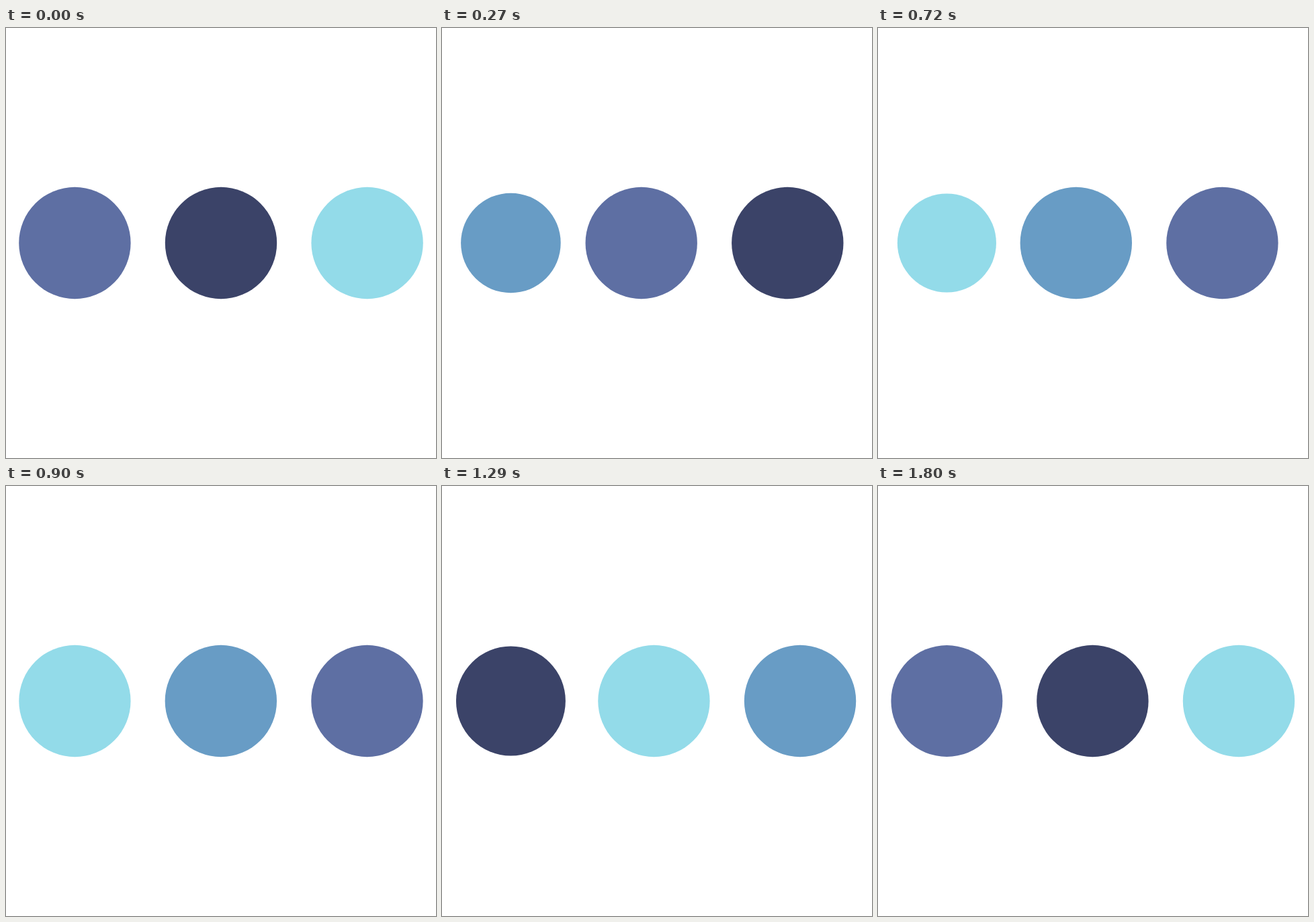
Animation, 640 px wide and 640 px high, one loop 1830 ms. Source, as an HTML page:

```html
<!DOCTYPE html>
<html lang="en">
<head>
<meta charset="utf-8">
<title>Loading dots</title>
<style>
html, body { margin: 0; width: 100%; height: 100%; overflow: hidden; background: #fff; }
svg { display: block; width: 100%; height: 100%; }
</style>
</head>
<body>
<svg viewBox="0 0 100 100"></svg>
<script>
const LOOP = 1830, STEP = 30, RADIUS = 13, LEFT = 16, GAP = 34;
const colors = ['#93dbe9', '#689cc5', '#5e6fa3', '#3b4368'];
const svg = document.querySelector('svg');

function addDot(fill) {
  const dot = document.createElementNS('http://www.w3.org/2000/svg', 'circle');
  dot.setAttribute('cy', 50);
  dot.setAttribute('fill', fill);
  return svg.appendChild(dot);
}

function place(dot, cx, r) {
  dot.setAttribute('cx', cx);
  dot.setAttribute('r', r);
}

// cubic-bezier(0, 0.5, 0.5, 1)
function ease(x) {
  let lo = 0, hi = 1;
  for (let i = 0; i < 30; i++) {
    const u = (lo + hi) / 2;
    if (1.5 * u * u - 0.5 * u ** 3 < x) lo = u; else hi = u;
  }
  return 1.5 * lo - 0.5 * lo ** 3;
}

const leaving = addDot(colors[0]);
const dots = colors.map(addDot);

function draw(now) {
  // Motion advances in 30 ms steps; 1 ms of slack absorbs clock rounding.
  const time = Math.floor((now + 1) / STEP) * STEP % LOOP;
  const phase = time / LOOP * 4;
  const turn = Math.floor(phase);
  const p = ease(phase - turn);

  // The last dot shrinks on the right while a new one grows on the left.
  leaving.setAttribute('fill', colors[(4 - turn) % 4]);
  place(leaving, LEFT + 2 * GAP, RADIUS * (1 - p));
  dots.forEach((dot, i) => {
    const stage = (turn + i) % 4;
    const moved = stage < 2 ? 0 : stage - 2 + p;
    const size = stage === 0 ? 0 : stage === 1 ? p : 1;
    place(dot, LEFT + GAP * moved, RADIUS * size);
  });
}

function frame(now) {
  draw(now);
  requestAnimationFrame(frame);
}
draw(0);
requestAnimationFrame(frame);
</script>
</body>
</html>
```
